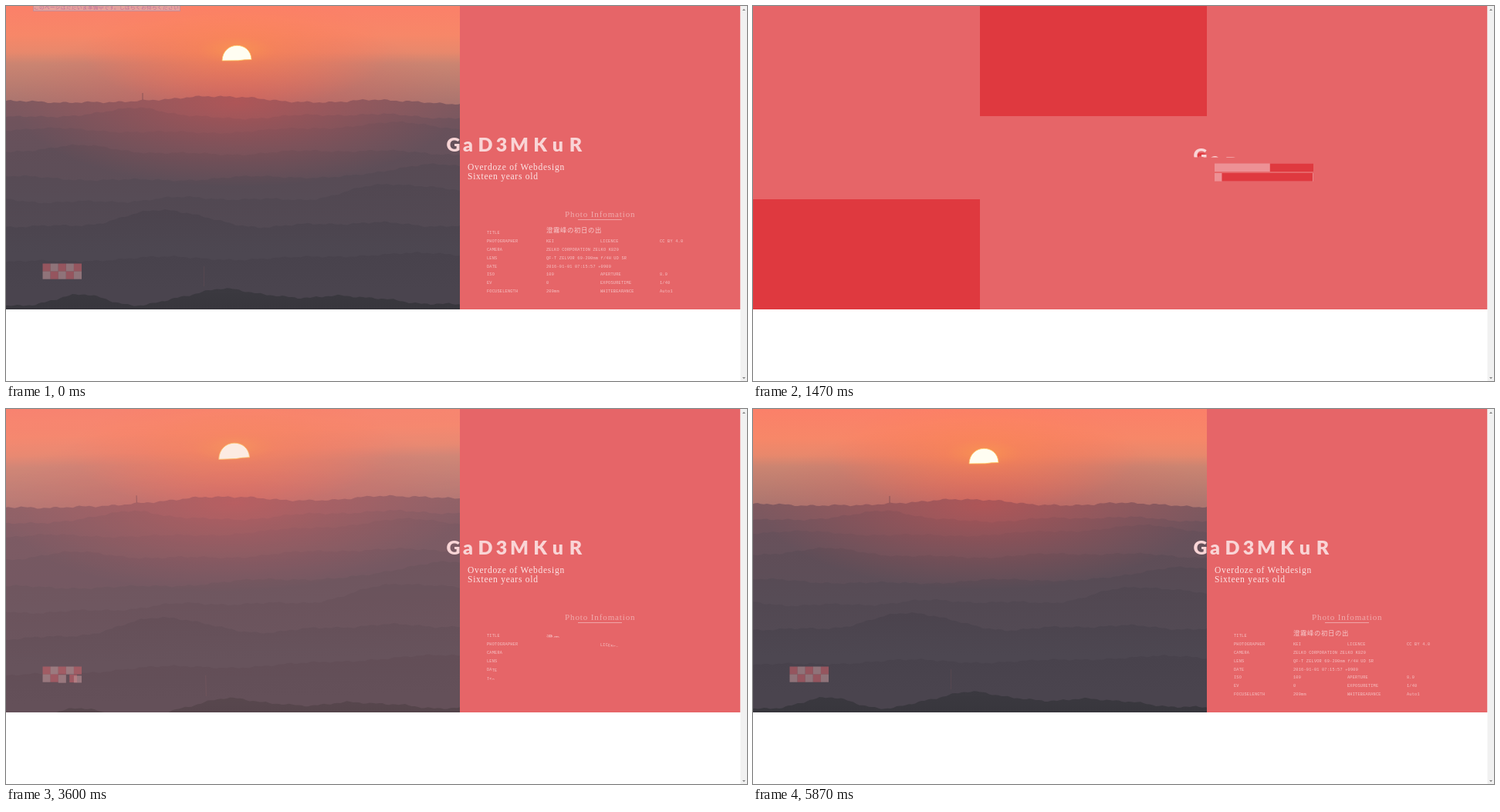
Recreate the animation shown at these times as an HTML page. Size 960 by 487 pixels, loop 5940 ms.

```html
<!DOCTYPE html>
<html lang="ja">
<head>
<meta charset="utf-8">
<title>Portfolio intro</title>
<style>
  html, body { margin: 0; width: 100%; height: 100%; overflow: hidden; background: #fff; }
  svg { display: block; width: 100%; height: 100%; }
  text { white-space: pre; }
  .name { font: 900 25px Lato, sans-serif; text-anchor: middle; }
  .lead { font: 11.5px "Liberation Serif", serif; letter-spacing: .73px; fill: #fce4e5; }
  .head { font: 11px "Liberation Serif", serif; letter-spacing: .88px; fill: #f1abad; }
  .cell { font: 5.2px "Liberation Mono", monospace; letter-spacing: .24px; fill: #f6c3c5; }
  .jp { font: 8.4px "Noto Sans CJK JP", "Noto Sans CJK", sans-serif; letter-spacing: .6px; fill: #f7cbcd; }
  .note { font: 6.6px "Noto Sans CJK JP", "Noto Sans CJK", sans-serif; letter-spacing: .4px; fill: #c0709a; }
</style>
</head>
<body>
<svg id="stage" viewBox="0 0 960 487">
  <defs>
    <linearGradient id="sky" gradientUnits="userSpaceOnUse" x1="0" y1="0" x2="0" y2="125">
      <stop offset="0" stop-color="#fb8069"/>
      <stop offset=".3" stop-color="#f78768"/>
      <stop offset=".48" stop-color="#e8886c"/>
      <stop offset=".6" stop-color="#cb8471"/>
      <stop offset="1" stop-color="#ab756f"/>
    </linearGradient>
    <radialGradient id="glow">
      <stop offset="0" stop-color="#ffa050" stop-opacity=".95"/>
      <stop offset=".25" stop-color="#ff8a55" stop-opacity=".65"/>
      <stop offset="1" stop-color="#ff7a5c" stop-opacity="0"/>
    </radialGradient>
    <radialGradient id="haze">
      <stop offset="0" stop-color="#e8524e" stop-opacity=".45"/>
      <stop offset="1" stop-color="#d85a5a" stop-opacity="0"/>
    </radialGradient>
    <clipPath id="view"></clipPath>
  </defs>
</svg>
<script>
const LOOP = 5940, STEP = 200 / 3, RELOAD = 470;
const W = 294, H = 394;
const BASE = '#e66568', DARK = '#df393f', LIGHT = '#ed9195', PALE = '#f9d5d6';

const stage = document.getElementById('stage');
const defs = stage.querySelector('defs');
const view = document.getElementById('view');

const set = (el, attrs) => {
  for (const k in attrs) el.setAttribute(k, attrs[k]);
  return el;
};
const add = (parent, tag, attrs = {}) =>
  parent.appendChild(set(document.createElementNS('http://www.w3.org/2000/svg', tag), attrs));
const box = (parent, x, y, width, height, fill) => add(parent, 'rect', { x, y, width, height, fill });
const label = (parent, str, attrs) => {
  const el = add(parent, 'text', attrs);
  el.textContent = str;
  return el;
};
const span = (t, start, dur) => Math.min(1, Math.max(0, (t - start) / dur));
const easeIn = p => p ** 3;
const easeOut = p => 1 - (1 - p) ** 3;
const easeInOut = p => p < .5 ? 4 * p ** 3 : 1 - 4 * (1 - p) ** 3;

let clips = 0;
function clipBox(x, y, width, height) {
  const clip = add(defs, 'clipPath', { id: 'c' + ++clips });
  return { ref: `url(#c${clips})`, rect: add(clip, 'rect', { x, y, width, height }) };
}

/* page */
box(stage, 0, 0, 951.5, H, BASE);
box(stage, 951.5, 0, 8.5, 487, '#f1f1f1');
add(stage, 'path', { d: 'M954 6l2-2.5 2 2.5zM954 482l2 2.5 2-2.5z', fill: '#8a8a8a' });

/* coloured blocks, the right column is mirrored */
const columns = [0, 1].map(i => ({
  dark: box(stage, i * W, 0, W, 0, DARK),
  light: box(stage, i * W, 0, W, 0, LIGHT),
  second: box(stage, i * W, 0, W, 0, DARK),
  photo: box(view, i * W, 0, W, 0, '#000'),
  flip: i === 1
}));
function place(rect, from, to, flip) {
  set(rect, { y: flip ? H - to : from, height: Math.max(0, to - from) });
}
function drawColumns(t) {
  const dark = H * easeIn(span(t, 600, 714)), light = H * easeIn(span(t, 642, 714));
  const darkOut = H * easeOut(span(t, 1395, 250)), lightOut = H * easeOut(span(t, 1330, 140));
  const next = H * easeOut(span(t, 1560, 346)), photo = H * easeOut(span(t, 1617, 400));
  for (const c of columns) {
    place(c.dark, darkOut, dark, c.flip);
    place(c.light, lightOut, light, c.flip);
    place(c.second, H - next, H - photo, c.flip);
    place(c.photo, H - photo, H, c.flip);
  }
}

/* sunrise */
const frame = add(stage, 'g', { 'clip-path': 'url(#view)' });
box(frame, 0, 0, 2 * W, H, LIGHT);
const photo = add(frame, 'g');
box(photo, -150, -150, 900, 750, 'url(#sky)');
add(photo, 'ellipse', { cx: 299, cy: 58, rx: 200, ry: 75, fill: 'url(#glow)' });

function ridge(y0, amp, period, seed, top, low, bumps) {
  let d = 'M-130 640';
  for (let x = -130; x <= 730; x += 4) {
    let y = y0 + amp * (.6 * Math.sin(x / period + seed) + .35 * Math.sin(x / period * 2.6 + seed * 2));
    y += 1.3 * Math.sin(x * 1.7 + seed) * Math.sin(x * .31);
    for (const [cx, h, w] of bumps) y -= h * Math.exp(-(((x - cx) / w) ** 2));
    d += `L${x} ${y.toFixed(1)}`;
  }
  const id = 'hill' + seed;
  const grad = add(defs, 'linearGradient', { id, x1: 0, y1: 0, x2: 0, y2: .15 });
  add(grad, 'stop', { offset: 0, 'stop-color': top });
  add(grad, 'stop', { offset: 1, 'stop-color': low });
  add(photo, 'path', { d: d + 'L730 640Z', fill: `url(#${id})` });
}
ridge(126.5, 1, 30, 1, '#80595f', '#735660', [[0, 4, 60], [265, 9, 95], [480, 4, 60]]);
ridge(143, 4, 50, 2, '#71535c', '#69535d', [[178, 10, 40]]);
ridge(162, 4, 60, 4, '#68505a', '#63525c', [[520, 10, 80]]);
ridge(190, 4, 55, 3, '#5f4d57', '#5d4f59', [[90, 6, 60]]);
ridge(224, 4, 60, 5, '#574a54', '#574d57', [[550, 22, 70]]);
ridge(252, 5, 50, 6, '#514751', '#534a54', [[500, 20, 90]]);
ridge(284, 4, 45, 7, '#4b434d', '#4d4751', [[210, 18, 60]]);
ridge(330, 5, 70, 8, '#48424c', '#4a444e', [[480, 10, 120]]);
ridge(389, 2, 30, 9, '#3b3940', '#36353b', [[100, 15, 38], [285, 20, 70], [440, 11, 100]]);
add(photo, 'path', { d: 'M177 113v9M256.500 338v26', stroke: '#5a4a52', 'stroke-width': .8 });
add(photo, 'ellipse', { cx: 299, cy: 125, rx: 290, ry: 110, fill: 'url(#haze)' });
add(photo, 'path', { d: 'M280 71C281 45 317 45 318 69.5l-9 .3-8 1z', fill: '#fffdf2', stroke: '#ffc860', 'stroke-width': .8 });

function drawPhoto(t) {
  const rest = (1 - span(t, 1500, 4350)) ** 2.5;
  set(photo, {
    opacity: 1 - .86 * rest,
    transform: `translate(294 197) rotate(${-8 * rest}) scale(${1 + .25 * rest}) translate(-294 -197)`
  });
}

/* small tiles that gather at the lower left */
const tiles = Array.from({ length: 10 }, (_, i) => {
  const col = i % 5, row = Math.floor(i / 5);
  const x = 47.5 + col * 10.1, y = 334.5 + row * 10.1;
  const from = [
    [x, y + 5, 0, 0],
    [x, y - 90, 10, 60],
    [x, H, 10, 40],
    [x + 110, y + 10, 0, 10],
    [x, y + 18, 10, 0]
  ][col];
  const el = box(frame, x, y, 10, 10, (col + row) % 2 ? '#c2979a' : '#cc626c');
  set(el, { opacity: .58 });
  return { el, from, to: [x, y, 10.1, 10.1], start: 2450 + col * 80 + row * 450 };
});
function drawTiles(t) {
  for (const { el, from, to, start } of tiles) {
    const p = easeOut(span(t, start, 700));
    ['x', 'y', 'width', 'height'].forEach((k, i) => el.setAttribute(k, from[i] + (to[i] - from[i]) * p));
    el.style.display = t < start ? 'none' : '';
  }
}

/* text whose letters rise one after another */
const risers = [];
function rise(str, x, y, cls, start, o = {}) {
  const { gap = 40, depth = 8, dur = 500, up = 6, down = 1.6, fill } = o;
  const left = Array.isArray(x) ? x[0] - 20 : x - 2;
  const g = add(stage, 'g', { 'clip-path': clipBox(left, y - up, 300, up + down).ref });
  const el = label(g, str, { x: Array.isArray(x) ? x.join(' ') : x, class: cls });
  if (fill) set(el, { fill });
  risers.push({ el, y, n: str.length, start, gap, depth, dur });
  return el;
}
function drawRisers(t) {
  for (const r of risers) {
    const ys = Array.from({ length: r.n }, (_, i) =>
      (r.y + r.depth * (1 - easeOut(span(t, r.start + i * r.gap, r.dur)))).toFixed(2));
    r.el.setAttribute('y', ys.join(' '));
  }
}

const NAME = 'GaD3MKuR', slots = [579.5, 598.5, 621, 642, 665, 692, 715, 738];
const nameLook = { gap: 47, depth: 28, dur: 520, up: 30, down: 7.5 };
const shade = rise(NAME, slots, 189, 'name', 1410, { ...nameLook, fill: DARK });
rise(NAME, slots, 189, 'name', 1356, { ...nameLook, fill: PALE });
const rule = box(stage, 572, 196, 0, 1, '#f0c3cb');

rise('Photo Infomation', 724, 274, 'head', 1860, { gap: 47, depth: 15, up: 11, down: 3.5 });
const underline = box(stage, 741, 277, 57, .8, '#f3b4b6');

const rowY = [296, 307, 318, 329, 340, 350, 361, 372];
['TITLE', 'PHOTOGRAPHER', 'CAMERA', 'LENS', 'DATE', 'ISO', 'EV', 'FOCUSELENGTH']
  .forEach((s, i) => rise(s, 623, rowY[i], 'cell', 2480 + 190 * i));
['KEI', 'ZELKO CORPORATION ZELKO K820', 'QF-T ZELVOR 60-200mm f/4H UD SR',
  '2016-01-01 07:15:57 +0900', '100', '0', '200mm']
  .forEach((s, i) => rise(s, 700, rowY[i + 1], 'cell', 3890 + 90 * i));
rise('澄霧峰の初日の出', 700, 294, 'jp', 3500, { depth: 12, up: 9, down: 2.5 });
[['LICENCE', 1, 3300, 'CC BY 4.0', 3920], ['APERTURE', 5, 3580, '8.0', 4420],
  ['EXPOSURETIME', 6, 3780, '1/40', 4530], ['WHITEBEARANCE', 7, 3970, 'Auto1', 4640]]
  .forEach(([key, row, t1, value, t2]) => {
    rise(key, 770, rowY[row], 'cell', t1);
    rise(value, 847, rowY[row], 'cell', t2);
  });

function drawRules(t) {
  const a = 175 * easeInOut(span(t, 1290, 170)), b = 175 * easeInOut(span(t, 1146, 290));
  set(rule, { x: 572 + a, width: Math.max(0, b - a) });
  set(underline, { width: 57 * easeInOut(span(t, 1950, 600)) });
  shade.style.display = t > 2500 ? 'none' : '';
}

/* two lines uncovered by bars */
const leads = ['Overdoze of Webdesign', 'Sixteen years old'].map((str, i) => {
  const top = 204.5 + i * 12.5;
  const clip = clipBox(598, top - 1, 0, 13);
  const g = add(stage, 'g', { 'clip-path': clip.ref });
  return {
    i, clip: clip.rect,
    text: label(g, str, { x: 598, y: 213 + i * 12.2, class: 'lead' }),
    light: box(stage, 598, top, 0, 10.6, LIGHT),
    dark: box(stage, 598, top, 0, 10.6, DARK)
  };
});
function drawLeads(t) {
  const full = 128;
  for (const l of leads) {
    const enter = 1100 + l.i * 43;
    const lightIn = full * easeInOut(span(t, enter, 350));
    const darkIn = full * easeInOut(span(t, enter + 18, 350));
    const darkOut = full * easeOut(span(t, 1318 + l.i * 133, 620));
    const shown = easeOut(span(t, 1470 + l.i * 92, 520));
    set(l.dark, { x: 598 + darkOut, width: Math.max(0, darkIn - darkOut) });
    set(l.light, { x: 598 + full * shown, width: Math.max(0, lightIn - full * shown) });
    set(l.clip, { width: (full + 2) * shown });
    set(l.text, { x: 598 - 60 * (1 - shown) });
  }
}

/* notice leaving at the top edge */
const notice = add(stage, 'g');
set(box(notice, 35.5, -6, 190, 12.5, '#e5a19c'), { stroke: '#c98a92', 'stroke-width': 1 });
label(notice, 'このページはただいま準備中です。しばらくお待ちください', { x: 36, y: 4.2, class: 'note' });

function draw(time) {
  const t = Math.floor((time % LOOP + 3.4) / STEP) * STEP;
  const pose = t < RELOAD - 5 ? LOOP : t;
  notice.style.display = t < 60 ? '' : 'none';
  drawColumns(pose);
  drawPhoto(pose);
  drawTiles(pose);
  drawRisers(pose);
  drawRules(pose);
  drawLeads(pose);
}

const began = performance.now();
function tick() {
  draw(performance.now() - began);
  requestAnimationFrame(tick);
}
tick();
</script>
</body>
</html>
```
